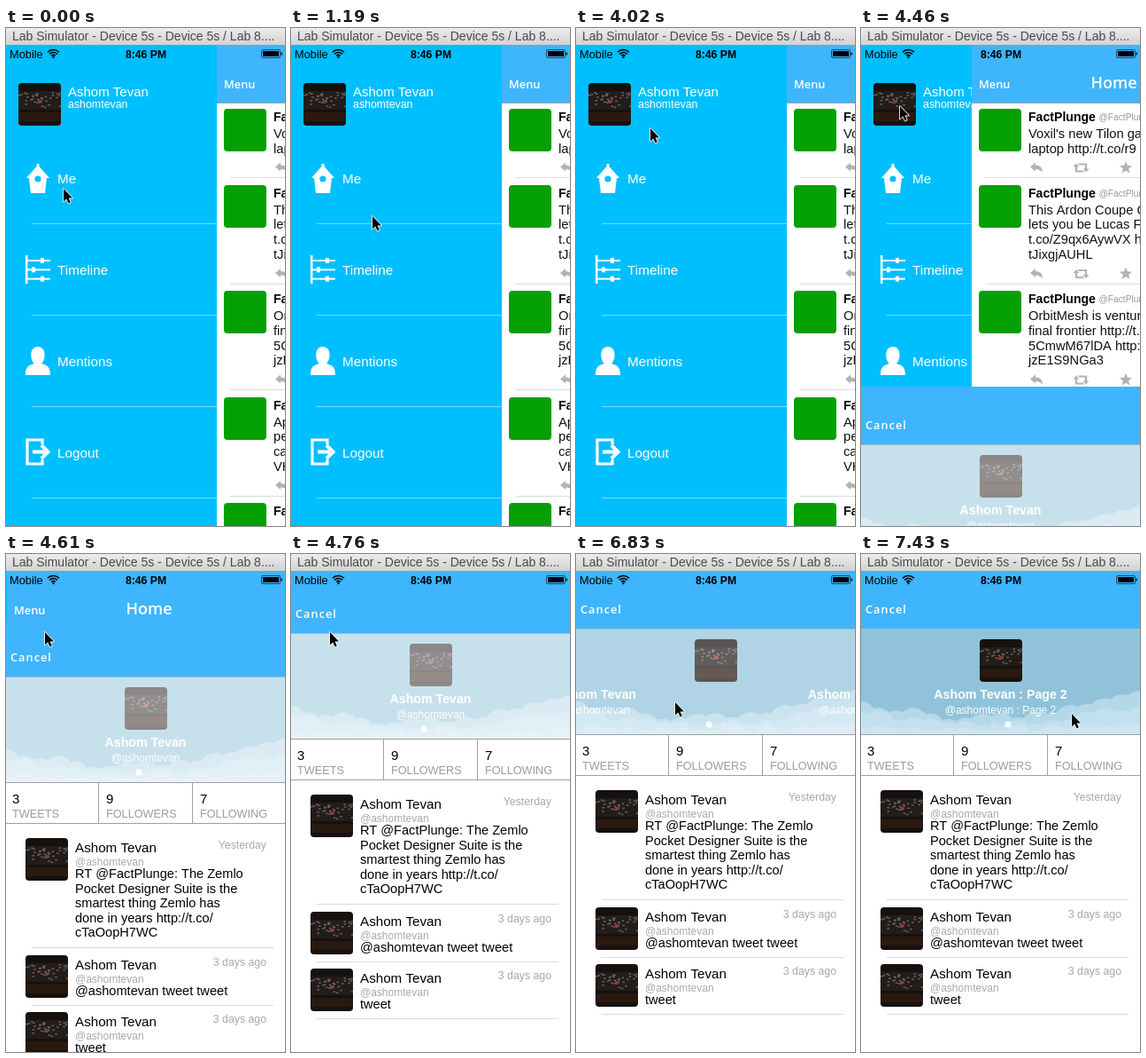
Recreate the animation shown at these times as an HTML page with a canvas. Size 315 by 561 pixels, loop 8000 ms.

```html
<!DOCTYPE html>
<html lang="en">
<head>
<meta charset="utf-8">
<title>Menu and profile</title>
<style>
html, body { margin: 0; width: 100%; height: 100%; overflow: hidden; background: #fff; }
canvas { display: block; width: 315px; height: 561px; }
</style>
</head>
<body>
<canvas id="stage"></canvas>
<script>
const W = 315, H = 561, LOOP = 8000, STEP = 146.67, TOP = 19;
const canvas = document.getElementById('stage');
const dpr = window.devicePixelRatio || 1;
canvas.width = W * dpr;
canvas.height = H * dpr;
const ctx = canvas.getContext('2d');

const SANS = '"Liberation Sans", Arial, sans-serif';
const HAND = '"Open Sans", "Noto Sans", sans-serif';
const BAR = '#3fb5fd', MENU = '#00bfff', GREY = '#a9a9a9', LINE = '#a0a0a0', ICON = '#b3b3b3';
const NAME = 'Ashom Tevan', HANDLE = 'ashomtevan';

// Pointer strokes: start, steps, sideways bend, end x, end y
const STROKES = [
  [0, 1, 0, 65, 181], [140, 1, 0, 64, 180],
  [1190, 3, 28, 92, 302], [1780, 6, 39, 74, 493],
  [2830, 1, 0, 80, 491], [2980, 4, 86, 40, 137],
  [3730, 4, 42, 44, 88], [4460, 3, 0, 44, 88],
  [4910, 5, 0, 144, 168], [5640, 1, 0, 178, 158],
  [5940, 2, 0, 68, 163], [6680, 6, 0, 238, 180]
];

const TWEETS = [
  ["Voxil's new Tilon gaming", 'laptop http://t.co/r9'],
  ['This Ardon Coupe Q concept', 'lets you be Lucas F', 't.co/Z9qx6AywVX http://', 'tJixgjAUHL'],
  ['OrbitMesh is venturing', 'final frontier http://t.co/', '5CmwM67lDA http://t.co/', 'jzE1S9NGa3'],
  ['Apps that help', 'people', 'call', 'VHs2'],
  ['']
];

const POSTS = [
  ['Yesterday', 'RT @FactPlunge: The Zemlo', 'Pocket Designer Suite is the', 'smartest thing Zemlo has', 'done in years http://t.co/', 'cTaOopH7WC'],
  ['3 days ago', '@' + HANDLE + ' tweet tweet'],
  ['3 days ago', 'tweet']
];

const clamp = u => Math.min(1, Math.max(0, u));
const smooth = u => (u = clamp(u), u * u * (3 - 2 * u));
const spring = w => w <= 0 ? 1 : (1 + w) * Math.exp(-w);
const noise = n => { const v = Math.sin(n * 12.9898) * 43758.5453; return v - Math.floor(v); };

function rect(x, y, w, h, fill) {
  ctx.fillStyle = fill;
  ctx.fillRect(x, y, w, h);
}

function rounded(x, y, w, h, r) {
  ctx.beginPath();
  ctx.moveTo(x + r, y);
  ctx.arcTo(x + w, y, x + w, y + h, r);
  ctx.arcTo(x + w, y + h, x, y + h, r);
  ctx.arcTo(x, y + h, x, y, r);
  ctx.arcTo(x, y, x + w, y, r);
  ctx.closePath();
}

function fillPath(d, fill) {
  ctx.fillStyle = fill;
  ctx.fill(new Path2D(d));
}

function strokePath(d, color, width) {
  ctx.strokeStyle = color;
  ctx.lineWidth = width;
  ctx.stroke(new Path2D(d));
}

function disc(x, y, r, fill) {
  ctx.beginPath();
  ctx.arc(x, y, r, 0, Math.PI * 2);
  ctx.fillStyle = fill;
  ctx.fill();
}

// y is the middle of the capital letters
function text(str, x, y, size, fill, { weight = '', align = 'left', family = SANS, gap = 0 } = {}) {
  ctx.font = `${weight} ${size}px ${family}`;
  ctx.textAlign = align;
  ctx.letterSpacing = gap + 'px';
  ctx.fillStyle = fill;
  ctx.fillText(str, x, y + size * 0.35);
}

const script = (str, x, y, size, opts) =>
  text(str, x, y, size, '#fff', { weight: '600', family: HAND, ...opts });

function at(x, y, draw) {
  ctx.save();
  ctx.translate(x, y);
  draw();
  ctx.restore();
}

function avatar(x, y) {
  at(x, y, () => {
    rounded(0, 0, 48, 48, 4);
    ctx.clip();
    rect(0, 0, 48, 48, '#16110f');
    rect(0, 9, 48, 21, '#221c1a');
    rect(0, 33, 48, 10, '#291910');
    for (let i = 0; i < 34; i++)
      rect(noise(i + 1) * 46, 10 + noise(i + 50) * 19, 2.5, 1.5, '#6a6462');
    rect(22, 19, 5, 3, '#8e3a2a');
  });
}

function titleBar() {
  const g = ctx.createLinearGradient(0, 0, 0, TOP);
  g.addColorStop(0, '#ececec');
  g.addColorStop(1, '#d2d2d2');
  rect(0, 0, W, TOP, g);
  text('Lab Simulator - Device 5s - Device 5s / Lab 8....', 7, 9, 14, '#4a4a4a');
}

function statusBar() {
  text('Mobile', 4, 29.5, 12.8, '#000');
  ctx.strokeStyle = '#000';
  ctx.lineWidth = 1.5;
  for (let r = 3; r < 10; r += 3) {
    ctx.beginPath();
    ctx.arc(53.5, 33.5, r, -Math.PI * 0.76, -Math.PI * 0.24);
    ctx.stroke();
  }
  disc(53.5, 33, 1.2, '#000');
  text('8:46 PM', 158, 29.5, 12.2, '#000', { weight: 'bold', align: 'center' });
  rounded(288.5, 24.5, 21, 9, 1.5);
  ctx.lineWidth = 0.6;
  ctx.stroke();
  rect(290, 26, 18, 6, '#000');
  rect(310.5, 27.5, 1.3, 3, '#000');
}

function houseIcon() {
  fillPath('M12.5 0h3v3L27 16h-3l-2 17H6L4 16H1L12.5 3z', '#fff');
  disc(14, 17, 3.6, MENU);
}

function slidersIcon() {
  rect(0, 0, 2.5, 32, '#fff');
  for (let i = 0; i < 3; i++) {
    const y = 6 + i * 10.3, knob = i === 1 ? 9 : 19;
    rect(0, y - 1, 28, 2, '#fff');
    rect(knob - 2, y - 3, 4, 6, '#fff');
  }
}

function personIcon() {
  fillPath('M14 0C24 0 23 15 18 19C24 21 28 22 28 32H0C0 22 4 21 10 19C5 15 4 0 14 0z', '#fff');
}

function exitIcon() {
  strokePath('M19 7V2H2V29H19V24', '#fff', 3.2);
  strokePath('M8 15.5H25M18 8L25.5 15.5L18 23', '#fff', 4);
}

const ITEMS = [['Me', houseIcon], ['Timeline', slidersIcon], ['Mentions', personIcon], ['Logout', exitIcon]];

function menu() {
  rect(0, TOP, W, H - TOP, MENU);
  avatar(14, 62);
  text(NAME, 70, 72, 15, '#fff');
  text(HANDLE, 70, 86, 12.4, '#fff');
  ITEMS.forEach(([label, icon], i) => at(0, i * 103, () => {
    at(22, 153, icon);
    text(label, 58, 170, 15.3, '#fff');
    rect(29, 220, 215, 1, 'rgba(255,255,255,.45)');
  }));
}

const replyIcon = () => fillPath('M-7 -1L-1 -6V-3Q7 -3 7 5Q4 1.5 -1 1.5V4z', ICON);

function repeatIcon() {
  for (let i = 0; i < 2; i++) {
    fillPath('M-9 -1L-5.5 -5L-2 -1H-4.3V3H2L4 5H-6.7V-1z', ICON);
    ctx.rotate(Math.PI);
  }
}

function starIcon() {
  ctx.beginPath();
  for (let i = 0; i < 10; i++) {
    const a = i * Math.PI / 5, r = i % 2 ? 3.3 : 7.5;
    ctx.lineTo(Math.sin(a) * r, -Math.cos(a) * r);
  }
  ctx.fillStyle = ICON;
  ctx.fill();
}

function navBar() {
  rect(0, TOP, W, H, '#fff');
  rect(0, TOP, W, 65, BAR);
}

function home() {
  navBar();
  rect(0, 84, W, 1, LINE);
  script('Menu', 8, 63.5, 12.8);
  script('Home', 160.5, 62, 18, { align: 'center' });
  let y = 84;
  TWEETS.forEach(lines => {
    const h = 51.5 + lines.length * 17;
    rounded(8, Math.floor(y + 7.5), 48, 48, 4);
    ctx.fillStyle = '#04a004';
    ctx.fill();
    text('FactPlunge', 64, y + 16.5, 14.1, '#000', { weight: 'bold' });
    text('@FactPlunge', 143.5, y + 16.5, 10.2, '#999');
    lines.forEach((s, i) => text(s, 64, y + 35 + i * 16.7, 14.7, '#111'));
    [replyIcon, repeatIcon, starIcon].forEach((icon, i) => at(73 + i * 50.5, y + h - 12, icon));
    y += h;
    rect(15, Math.floor(y) - 1, W, 1, '#dcdcdc');
  });
}

// A bank of puffs, high at both sides and highest on the right
function clouds(base, amp, tilt, fill) {
  for (let i = 0; i < 17; i++) {
    const u = i / 16;
    const y = base + Math.sin(Math.PI * u) * amp - u * tilt;
    disc(u * W, y + noise(i + base) * 6, 15 + noise(i + amp) * 6, fill);
  }
}

function header(page) {
  ctx.save();
  ctx.beginPath();
  ctx.rect(0, 84, W, 119);
  ctx.clip();
  rect(0, 84, W, 119, '#90c3da');
  clouds(181, 23, 12, '#b5d8e8');
  clouds(192, 17, 8, '#c3e0ed');
  clouds(208, 5, 2, '#cde5f0');
  avatar(134, 96);
  rect(0, 84, W, 119, `rgba(255,255,255,${0.5 * (1 - page)})`);
  ['', ' : Page 2'].forEach((suffix, i) => {
    const x = 157.5 + (i - page) * W;
    text(NAME + suffix, x, 158, 14.2, '#fff', { weight: 'bold', align: 'center' });
    text('@' + HANDLE + suffix, x, 176, 12, '#fff', { align: 'center' });
    const active = i === Math.round(page);
    disc(150 + i * 16, 192, 3.6, active ? '#fff' : 'rgba(255,255,255,.22)');
  });
  ctx.restore();
}

function stats() {
  rect(0, 203, W, 1, LINE);
  rect(0, 249, W, 1, LINE);
  [['3', 'TWEETS'], ['9', 'FOLLOWERS'], ['7', 'FOLLOWING']].forEach(([n, label], i) => {
    const x = i * 106;
    text(n, x + 7, 222, 15, '#000');
    text(label, x + 7, 238.5, 12.7, '#9b9b9b');
    if (i) rect(x - 2, 203, 1, 46, LINE);
  });
}

function profile(page) {
  navBar();
  script('Cancel', 5, 62.5, 12.8, { gap: 1 });
  header(page);
  rect(0, 84, W, 1, '#9fb9c6');
  stats();
  let top = 266;
  POSTS.forEach(([when, ...lines]) => {
    const y = Math.round(top);
    avatar(22, y);
    text(NAME, 78, y + 11, 15.2, '#000');
    text(when, 294, y + 7.5, 12.3, GREY, { align: 'right' });
    text('@' + HANDLE, 78, y + 26.5, 12, GREY);
    lines.forEach((s, i) => text(s, 78, y + 40 + i * 16.5, 14.6, '#000'));
    top += 47.5 + lines.length * 16.8;
    rect(29, Math.round(top - 8.3), 273, 1, '#dadada');
  });
}

function pointer() {
  const d = 'M0 0V14.5L3.3 11.5L5.6 16.5L7.8 15.5L5.6 10.6H10z';
  ctx.lineJoin = 'round';
  strokePath(d, '#fff', 1.6);
  fillPath(d, '#000');
}

function sample(clock) {
  const n = STROKES.filter(s => s[0] <= clock).length - 1;
  const [start, steps, bend, x1, y1] = STROKES[n];
  const [, , , x0, y0] = STROKES[Math.max(0, n - 1)];
  const k = Math.min(steps - 1, Math.floor((clock - start) / STEP));
  const u = smooth((k + 1) / steps);
  return {
    t: start + k * STEP,
    x: Math.round(x0 + (x1 - x0) * u + bend * Math.sin(Math.PI * u)),
    y: Math.round(y0 + (y1 - y0) * u)
  };
}

function render(now) {
  const { t, x, y } = sample(now % LOOP);
  const slide = Math.round(238 * (1 - smooth((t - 4315) / 300)));
  const drop = Math.floor(543 * spring((t - 4404) / 52.3));
  const page = smooth((t - 6600) / 500);

  ctx.setTransform(dpr, 0, 0, dpr, 0, 0);
  menu();
  at(slide, 0, home);
  if (t > 4404) at(0, drop, () => profile(page));
  statusBar();
  titleBar();
  at(x, y, pointer);
}

function tick(now) {
  render(now);
  requestAnimationFrame(tick);
}
render(0);
requestAnimationFrame(tick);
</script>
</body>
</html>
```
